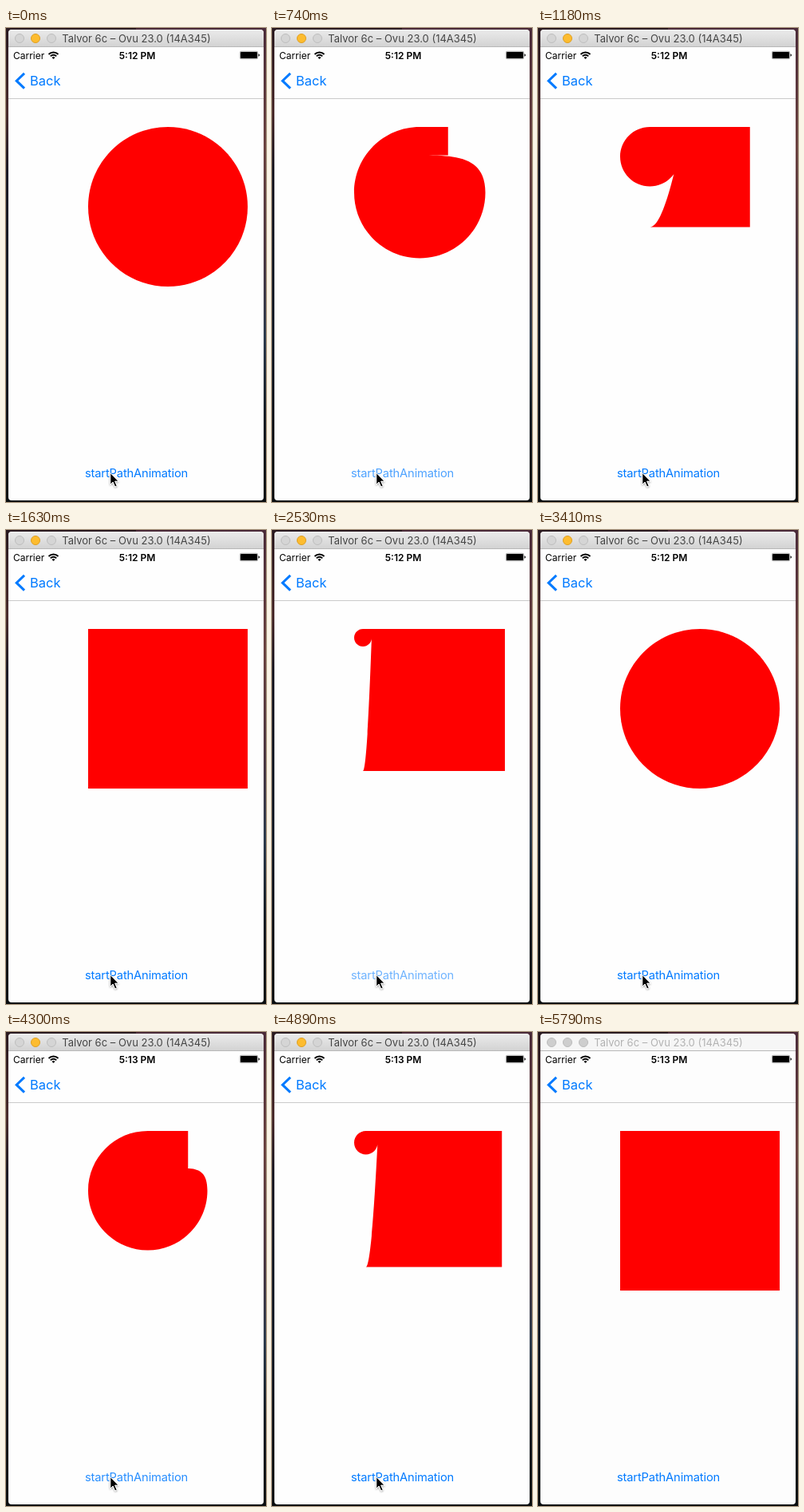
An HTML page that plays this animation: 326 px wide and 594 px high, repeating every 5890 ms.

```html
<!DOCTYPE html>
<html lang="en">
<head>
<meta charset="utf-8">
<title>Path animation</title>
<style>
  html, body { margin: 0; width: 100%; height: 100%; overflow: hidden; background: #111; }
  svg { display: block; font-family: Inter, Roboto, sans-serif; }
  .inactive #title { fill: #b2b2b2; }
  .inactive #bar { fill: #f6f6f6; }
  .inactive #lights circle { fill: #cecece; stroke: #bcbcbc; }
  .inactive #cursor { display: none; }
  .inactive #page { fill: #fdfdfd; }
</style>
</head>
<body>
<svg id="stage" width="326" height="594" viewBox="0 0 326 594">
  <defs>
    <linearGradient id="deskLeft" x2="0" y2="1">
      <stop offset="0" stop-color="#2a1a20"/>
      <stop offset=".18" stop-color="#4a2b2c"/>
      <stop offset=".3" stop-color="#1b1a24"/>
      <stop offset=".65" stop-color="#141c28"/>
      <stop offset="1" stop-color="#0a0d0f"/>
    </linearGradient>
    <linearGradient id="deskRight" x2="0" y2="1">
      <stop offset="0" stop-color="#4a2a38"/>
      <stop offset=".25" stop-color="#6b4240"/>
      <stop offset=".48" stop-color="#4a3540"/>
      <stop offset=".65" stop-color="#2c3a4c"/>
      <stop offset=".82" stop-color="#141b22"/>
      <stop offset="1" stop-color="#0a0d0f"/>
    </linearGradient>
    <linearGradient id="chrome" x2="0" y2="1">
      <stop offset="0" stop-color="#ebebeb"/>
      <stop offset="1" stop-color="#d2d2d2"/>
    </linearGradient>
    <filter id="shadow" x="-50%" y="-50%" width="200%" height="200%">
      <feDropShadow dx="0" dy="1" stdDeviation="1" flood-opacity=".4"/>
    </filter>
  </defs>

  <rect width="163" height="594" fill="url(#deskLeft)"/>
  <rect x="163" width="163" height="594" fill="url(#deskRight)"/>
  <rect id="page" x="3" y="2" width="320" height="590" rx="4" fill="#fefefe"/>

  <path id="bar" d="M3 24V7a5 5 0 0 1 5-5H318a5 5 0 0 1 5 5V24z" fill="url(#chrome)"/>
  <path d="M3 23.5H323" stroke="#b8b8b8"/>
  <g id="lights" fill="#d5d5d5" stroke="#bebebe">
    <circle cx="17" cy="13" r="5.5"/>
    <circle cx="37" cy="13" r="5.5" style="--on:1" fill="#fdbc2f" stroke="#dfa023"/>
    <circle cx="57" cy="13" r="5.5"/>
  </g>
  <text id="title" x="163.5" y="18" font-size="13" text-anchor="middle" fill="#454545">Talvor 6c – Ovu 23.0 (14A345)</text>

  <text x="9" y="38.5" font-size="12">Carrier</text>
  <g fill="none" stroke="#000" stroke-width="1.9">
    <path d="M53.5 33a8.5 8.5 0 0 1 12 0M55.8 35.3a5.2 5.2 0 0 1 7.4 0"/>
    <path d="M59.5 39l-2-2a2.8 2.8 0 0 1 4 0z" fill="#000" stroke="none"/>
  </g>
  <text id="clock" x="164.5" y="38.5" font-size="12" font-weight="600" text-anchor="middle">5:12 PM</text>
  <rect x="293.25" y="29.25" width="22.5" height="9.5" rx="1.8" fill="none" stroke="#555" stroke-width=".5"/>
  <rect x="294" y="30" width="21" height="8" rx="1"/>
  <path d="M316.5 32.2q1.5 .5 1.5 1.8t-1.5 1.8z"/>

  <path d="M23 56.8L13.2 66.2L23 75.6" fill="none" stroke="#007aff" stroke-width="3"/>
  <text x="30" y="72" font-size="16.5" fill="#007aff">Back</text>
  <path d="M3 88.5H323" stroke="#cbcbcb"/>

  <path id="shape" fill="#f00"/>
  <text id="button" x="163.5" y="562.5" font-size="14.7" letter-spacing="-.15" text-anchor="middle" fill="#007aff">startPathAnimation</text>
  <path id="cursor" d="M130.8 557.5v14.6l3.3-3.1 2.6 6 2.5-1.1-2.6-5.8h4.6z" stroke="#fff" filter="url(#shadow)"/>
</svg>
<script>
const LOOP = 5890, STEP = 1030 / 7;
const el = id => document.getElementById(id);

// Each tap toggles the shape; lag is the delay in seconds before it moves.
const taps = [
  { at: 450, lag: .1225, toSquare: true },
  { at: 2380, lag: .04, toSquare: false },
  { at: 4010, lag: .0475, toSquare: true },
];
const clamp = (v, lo, hi) => Math.min(hi, Math.max(lo, v));

// Blend of a circle path and a square path, squareness q from 0 to 1.
function morph(q) {
  const c = 1.5523, k = .4477;
  const p = (x, y, u = 0, v = 0) =>
    `${103 + 100 * (x * (1 - q) + u * q)} ${124 + 100 * (y * (1 - q) + v * q)} `;
  return 'M' + p(2, 1) +
    'C' + p(2, c) + p(c, 2) + p(1, 2) +
    'C' + p(k, 2) + p(0, c) + p(0, 1) +
    'C' + p(0, k) + p(k, 0) + p(1, 0) +
    'L' + p(1, 0, 2, 0) + p(1, 0, 2, 2) + p(1, 0, 0, 2) +
    'C' + p(c, 0, 0, 2) + p(2, k) + p(2, 1) + 'Z';
}

function draw(now) {
  const t = now % LOOP;
  const tap = taps.findLast(tap => t >= tap.at);
  let q = 0, opacity = 1;
  if (tap) {
    const step = Math.floor((t - tap.at + 6) / STEP);
    const elapsed = step * .15 - tap.lag;
    const progress = clamp(elapsed, 0, 1);
    q = tap.toSquare ? progress : 1 - progress;
    opacity = clamp(.34 + 2 * elapsed, .2, 1);
  }
  el('shape').setAttribute('d', morph(q));
  el('button').setAttribute('opacity', opacity);
  el('clock').textContent = t < 4150 ? '5:12 PM' : '5:13 PM';
  el('cursor').setAttribute('transform', `translate(0 ${t < 5040 ? 0 : 4})`);
  el('stage').classList.toggle('inactive', t >= 5790);
}

const start = performance.now();
function tick() {
  draw(performance.now() - start);
  requestAnimationFrame(tick);
}
tick();
</script>
</body>
</html>
```
